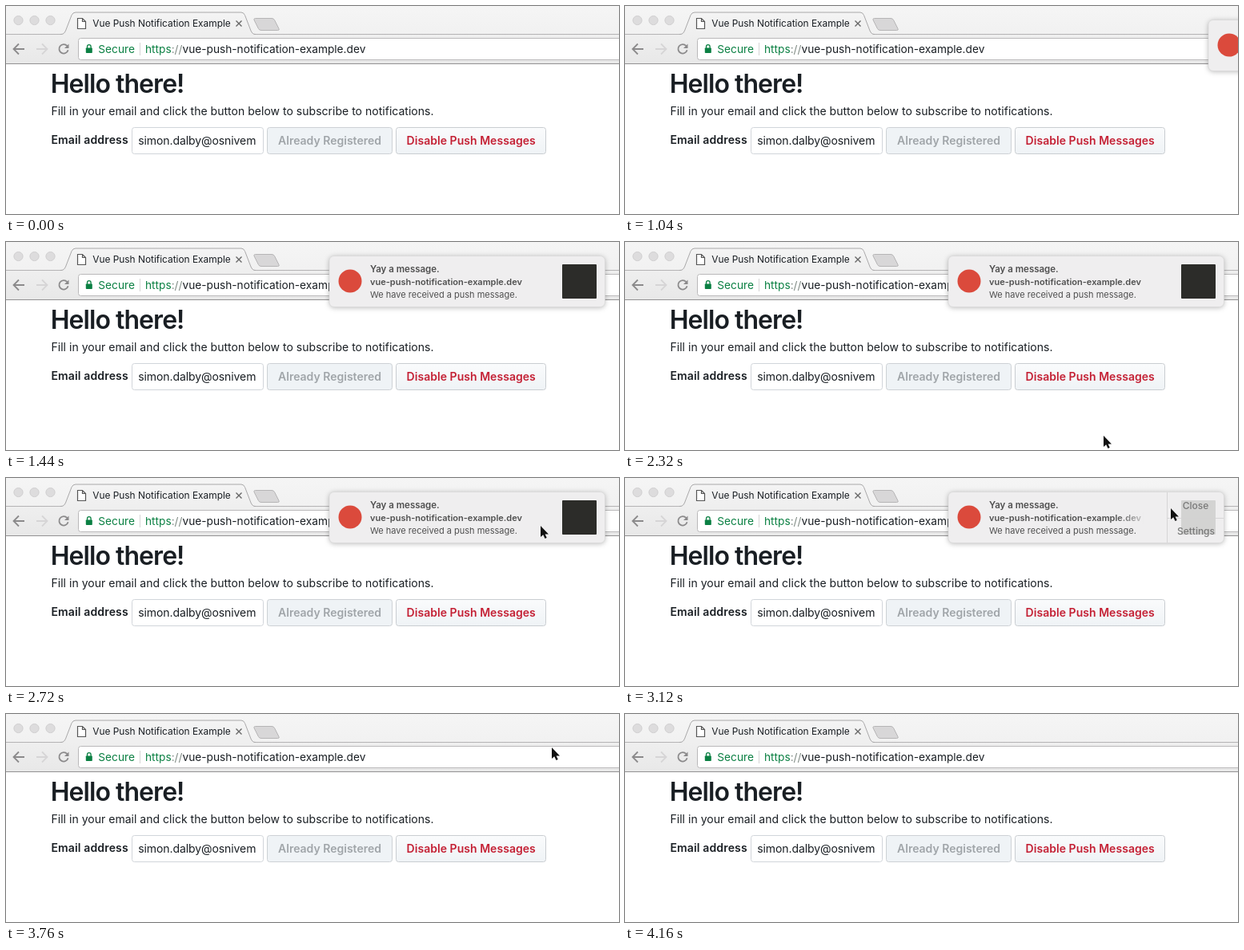
These frames come from a looping animation (766 by 261 pixels, 4.56 s). An HTML page:

```html
<!DOCTYPE html>
<html lang="en">
<head>
<meta charset="utf-8">
<title>Push notification demo</title>
<style>
  html, body { margin: 0; width: 100%; height: 100%; overflow: hidden; background: #fff; }
  svg { display: block; }
  text { font-family: Inter, "Open Sans", sans-serif; font-size: 14px; font-optical-sizing: none; fill: #191e23; }
  .bold { font-weight: 600; }
  .mid { text-anchor: middle; }
  .bar { font-size: 13.7px; }
  .note text { font-size: 11px; fill: #4f4f4f; }
  .note .action { font-size: 12px; font-weight: 500; fill: #6a6a6a; text-anchor: middle; }
  .card { filter: drop-shadow(0 1px 3px rgba(0, 0, 0, .28)); }
  .line { fill: none; stroke-width: 1.8; }
</style>
</head>
<body>
<svg width="766" height="261" viewBox="0 0 766 261">
  <defs>
    <linearGradient id="strip" x2="0" y2="1">
      <stop stop-color="#f5f5f5"/><stop offset="1" stop-color="#f1f1f1"/>
    </linearGradient>
    <linearGradient id="toolbar" gradientUnits="userSpaceOnUse" x2="0" y1="8" y2="72">
      <stop stop-color="#f4f4f4"/><stop offset="1" stop-color="#e8e8e8"/>
    </linearGradient>
    <linearGradient id="button" x2="0" y2="1">
      <stop stop-color="#fafbfc"/><stop offset="1" stop-color="#eff3f6"/>
    </linearGradient>
    <linearGradient id="veil">
      <stop stop-color="#efeeef" stop-opacity="0"/><stop offset="1" stop-color="#efeeef"/>
    </linearGradient>
    <clipPath id="field"><rect x="158" y="153" width="157" height="32"/></clipPath>
  </defs>

  <!-- browser window -->
  <rect width="766" height="36" fill="url(#strip)"/>
  <rect y="35" width="766" height="37" fill="url(#toolbar)"/>
  <path d="M0 35.5H766" stroke="#b4b3b4"/>
  <path d="M0 72.5H766" stroke="#929192"/>
  <g fill="#dddcdd" stroke="#d0cfd0">
    <circle cx="15.5" cy="18" r="5.6"/><circle cx="35.5" cy="18" r="5.6"/><circle cx="55.5" cy="18" r="5.6"/>
  </g>
  <path d="M68 36C72 35.5 73 34 74.500 31L82 11.500Q83.500 8 87 8H294Q297 8 298.500 11.500L306 31C307.500 34 308.500 35.500 312 36Z" fill="url(#toolbar)"/>
  <path d="M68 35.5C72 35.500 73 34 74.500 31L82 11.500Q83.500 8 87 8H294Q297 8 298.500 11.500L306 31C307.500 34 308.500 35.500 312 35.500" fill="none" stroke="#a9a8a9"/>
  <path d="M311.500 15.500H332Q334.500 15.500 335.500 17.500L341 28.500Q342 30.500 339.500 30.500H319Q316.500 30.500 315.500 28.500L310 17.500Q309.500 15.500 311.500 15.500Z" fill="#d8d7d8" stroke="#b6b5b6"/>
  <path d="M89.500 15.500H95.500L99.500 19.500V28.500H89.500ZM95.500 15.500V19.500H99.500" fill="#fff" stroke="#555" stroke-width="1.200"/>
  <path d="M287.500 18.500L294.500 25.500M294.500 18.500L287.500 25.500" stroke="#666" stroke-width="1.400"/>
  <text x="108.200" y="26" style="font-size:11.9px">Vue Push Notification Example</text>

  <path class="line" d="M23 54H10M16 47.500L9.500 54L16 60.500" stroke="#8b8a8b"/>
  <path class="line" d="M38 54H51M45 47.500L51.500 54L45 60.500" stroke="#d6d5d6"/>
  <path class="line" d="M76.500 50.200A5.700 5.700 0 1 0 77.600 55.300" stroke="#8b8a8b"/>
  <path d="M78.500 47.500V53H73Z" fill="#8b8a8b"/>
  <rect x="90.500" y="40.500" width="690" height="27" rx="3" fill="#fff" stroke="#b9b8b9"/>
  <path d="M101.500 53V51A2.300 2.300 0 0 1 106.100 51V53" fill="none" stroke="#0b8043" stroke-width="1.300"/>
  <rect x="99.800" y="52.500" width="8" height="6.500" rx=".8" fill="#0b8043"/>
  <text class="bar" x="115.300" y="59" style="fill:#0b8043">Secure</text>
  <path d="M167.500 46V62" stroke="#d5d5d5"/>
  <text class="bar" x="174" y="59"><tspan fill="#0b8043">https</tspan><tspan fill="#7f8a84">://</tspan>vue-push-notification-example.dev</text>

  <!-- page -->
  <text class="bold" x="55.700" y="109" style="font-size:32px;letter-spacing:-.95px">Hello there!</text>
  <text x="56.500" y="137" style="letter-spacing:.02px">Fill in your email and click the button below to subscribe to notifications.</text>
  <text class="bold" x="56.500" y="173" style="letter-spacing:.14px">Email address</text>
  <rect x="157.500" y="152.500" width="164" height="33" rx="3" fill="#fff" stroke="#d1d5da"/>
  <text x="165.200" y="174" style="letter-spacing:-.08px" clip-path="url(#field)">simon.dalby@osnivem</text>
  <rect x="326.500" y="152.500" width="156" height="33" rx="3" fill="#eff3f6" stroke="#cdd1d5"/>
  <text class="bold mid" x="404.500" y="174" style="fill:#a0a5a9">Already Registered</text>
  <rect x="487.500" y="152.500" width="187" height="33" rx="3" fill="url(#button)" stroke="#c9cdd1"/>
  <text class="bold mid" x="581.200" y="174" style="fill:#c42034;letter-spacing:.04px">Disable Push Messages</text>

  <!-- notification -->
  <g id="note" class="note" visibility="hidden">
    <rect class="card" x="404" y="17.500" width="344.500" height="64" rx="6" fill="#efeeef"/>
    <rect x="404" y="17.500" width="344.500" height="64" rx="6" fill="none" stroke="#d6d5d6" stroke-width=".6"/>
    <circle cx="430" cy="49" r="14.500" fill="#db4a3c"/>
    <text class="bold" x="455" y="38" style="font-size:11.5px">Yay a message.</text>
    <text class="bold" x="455" y="54">vue-push-notification-example.dev</text>
    <text x="455" y="70">We have received a push message.</text>
    <rect id="icon" x="695" y="28" width="43" height="43" rx="1" fill="#2c2c29"/>
    <g id="actions">
      <rect x="614" y="43" width="38" height="15" fill="url(#veil)"/>
      <path d="M677.500 18V81M678 50.500H748" stroke="#d3d2d3"/>
      <text class="action" x="713" y="39">Close</text>
      <text class="action" x="713.500" y="71">Settings</text>
    </g>
  </g>

  <path id="cursor" visibility="hidden" d="M0 0V14L3.200 11.200L5.500 16L7.800 15L5.600 10.400H10Z" fill="#111" stroke="#fff" stroke-width="1" paint-order="stroke"/>
</svg>
<script>
const LOOP = 4560, STEP = 80;
const $ = id => document.getElementById(id);
const note = $('note'), icon = $('icon'), actions = $('actions'), cursor = $('cursor');

// time, x, y
const path = [
  [2320, 598, 243], [2400, 603, 226], [2480, 617, 182], [2560, 637, 128],
  [2640, 655, 86], [2720, 668, 60], [2800, 677, 46], [2880, 681, 40],
  [3120, 682, 38], [3360, 695, 35], [3680, 696, 35], [3760, 682, 42],
  [3840, 620, 75], [3920, 498, 131], [4000, 330, 180], [4080, 171, 216]
];
// time, opacity
const fade = [[3360, 1], [3440, .75], [3520, .4], [3600, .14], [3680, 0]];
const hover = [[2720, 0], [3120, .86], [3200, 1]];

function at(keys, t) {
  const i = keys.findIndex(k => k[0] > t);
  if (i < 0) return keys[keys.length - 1].slice(1);
  if (i === 0) return keys[0].slice(1);
  const a = keys[i - 1], b = keys[i], p = (t - a[0]) / (b[0] - a[0]);
  return a.slice(1).map((v, n) => v + (b[n + 1] - v) * p);
}

const show = (el, on) => el.setAttribute('visibility', on ? 'visible' : 'hidden');
const move = (el, x, y) => el.setAttribute('transform', `translate(${x} ${y})`);

function draw(time) {
  const t = Math.floor(time % LOOP / STEP) * STEP;
  const slide = Math.min(1, Math.max(0, (t - 941) / 480));
  const [alpha] = at(fade, t), [over] = at(hover, t);

  show(note, t >= 1040 && alpha > 0);
  move(note, Math.round(181 * (1 + Math.cos(Math.PI * slide))), 0);
  note.setAttribute('opacity', alpha);
  icon.setAttribute('opacity', 1 - over);
  actions.setAttribute('opacity', over);

  show(cursor, t >= 2320 && t < 4160);
  move(cursor, ...at(path, t));
}

const start = performance.now();
function tick() {
  draw(performance.now() - start);
  requestAnimationFrame(tick);
}
tick();
</script>
</body>
</html>
```
